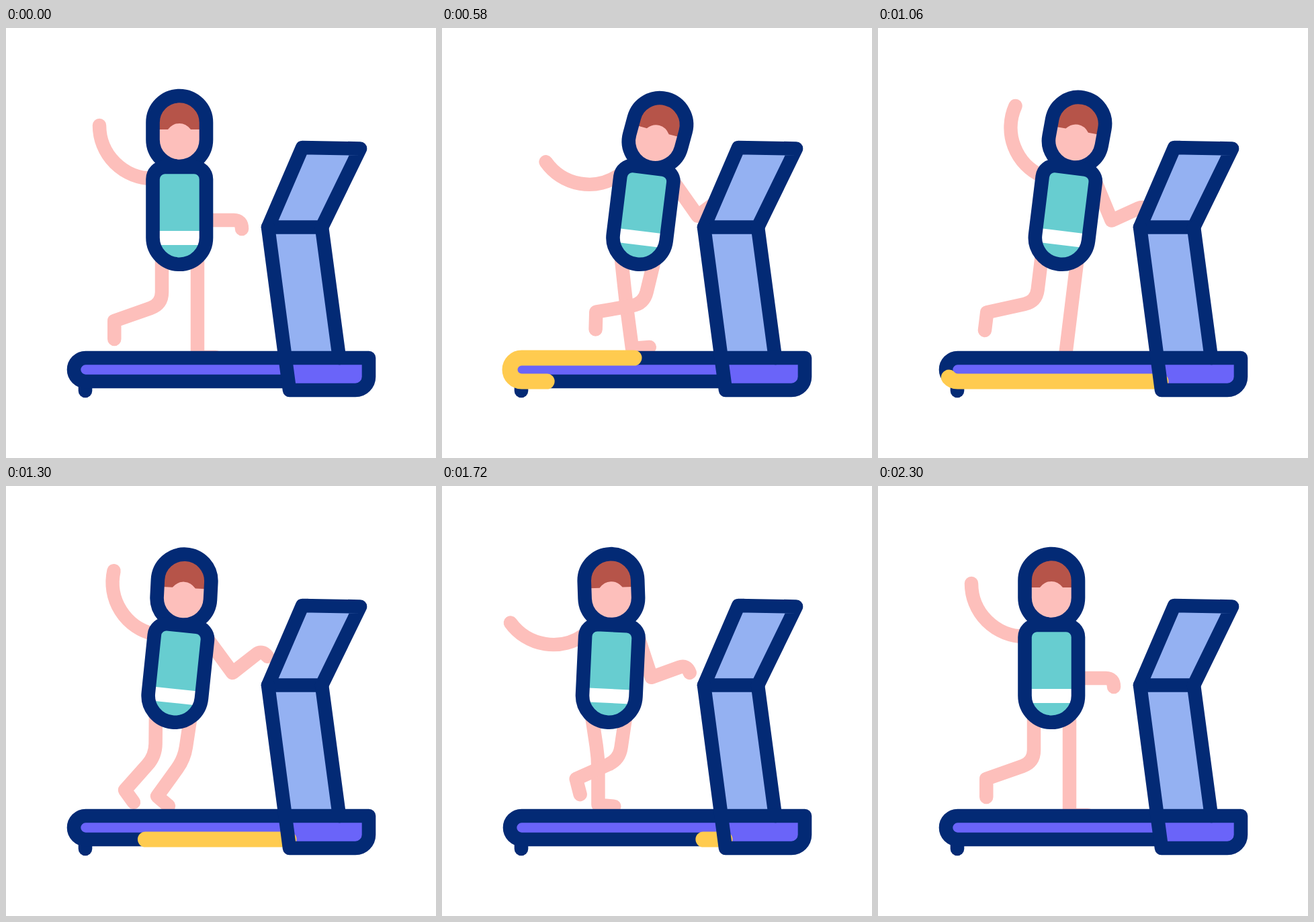
These frames come from a looping animation (640x640 px, 2400 ms). An HTML page:

```html
<!DOCTYPE html>
<html lang="en">
<head>
<meta charset="utf-8">
<title>Treadmill</title>
<style>
html, body { margin: 0; width: 100%; height: 100%; overflow: hidden; background: #fff; }
svg { display: block; width: 100vw; height: 100vh; }
.ink, .skin { fill: none; stroke-linecap: round; stroke-linejoin: round; }
.ink { stroke: #032a75; stroke-width: 20.6px; }
.skin { stroke: #fdbfbb; stroke-width: 20.5px; }
</style>
</head>
<body>
<svg viewBox="0 0 640 640">
  <g id="body">
    <path id="backArm" class="skin" d="M139 145A79 79 0 0 0 218 224"/>
    <path id="frontArm" class="skin" d="M297 222L295 286H339Q351 286 351 299"/>
    <path id="legA" class="skin"/>
    <path id="legB" class="skin"/>
    <g id="head">
      <rect x="218.500" y="101" width="79.500" height="105" rx="39.750" fill="#fdbfbb"/>
      <path fill="#b65449" d="M226 141a32 32 0 0 1 64 0V151H275Q268 142 258 142T241 151H226Z"/>
      <rect class="ink" x="218.500" y="101" width="79.500" height="105" rx="39.750"/>
    </g>
    <path fill="#67cdd0" d="M222 210H294V312A36 36 0 0 1 222 312Z"/>
    <path fill="#fff" d="M222 302H294V323H222Z"/>
    <path class="ink" d="M236 207H280A18 18 0 0 1 298 225V312A39.750 39.750 0 0 1 218.500 312V225A18 18 0 0 1 236 207Z"/>
  </g>

  <path class="ink" d="M118 526V540"/>
  <path fill="#6a64f9" d="M118.500 491H416L421 526H118.500A17.500 17.500 0 0 1 118.500 491Z"/>
  <path class="ink" d="M416 491H118.500A17.500 17.500 0 0 0 118.500 526H419"/>

  <path fill="#94b1f2" d="M390 296.500L441 178L527 179.500L470 296.500L496 491H416Z"/>
  <path fill="#6a64f9" d="M416 491H540V519A20 20 0 0 1 520 539H422Z"/>
  <path id="mark" fill="none" stroke="#ffcb4f" stroke-width="23" stroke-linecap="round"
    d="M416 491H118.500A17.500 17.500 0 0 0 118.500 526H421"/>
  <path class="ink" d="M390 296.500L441 178L527 179.500L470 296.500Z"/>
  <path class="ink" d="M470 296.500L496 491"/>
  <path class="ink" d="M390 296.500L422 539H520A20 20 0 0 0 540 519V491H416"/>
</svg>
<script>
const LOOP = 2400, STEP = 20;
const el = {};
for (const node of document.querySelectorAll('[id]')) el[node.id] = node;

const clamp = (v, max) => Math.max(0, Math.min(max, v));
const mix = (a, b, k) => a + (b - a) * k;

// Gentle ease in and out, halfway between linear and smoothstep.
const ramp = (t, from, to) => {
  const u = clamp((t - from) / (to - from), 1);
  return mix(u, u * u * (3 - 2 * u), 0.5);
};

// A value that starts at 0 and is moved by [from ms, to ms, amount].
const track = (...moves) => t =>
  moves.reduce((sum, [from, to, by]) => sum + by * ramp(t, from, to), 0);

const shift = track([0, 540, 36], [810, 1350, -45.5], [1720, 2160, 9.5]);
const lean = track([0, 540, 7], [1080, 2160, -7]);
const nod = track([0, 660, 16.5], [800, 1520, -18.5], [1720, 2300, 2]);
const backSwing = track([50, 540, -43.5], [560, 1080, 62], [1200, 1620, -62], [1640, 2160, 43.5]);
const frontSwing = track([0, 400, -44], [580, 940, 18], [940, 1300, -18], [1300, 2160, 44]);
const stride = track([0, 540, 1], [540, 960, -1], [1080, 1620, 1], [1620, 2040, -1]);

// Angles run from straight down, positive towards the console.
const legs = [
  { path: el.legA, hip: 232, thigh: [0, 14], shin: [-70.6, 20], foot: [0, 108], stretch: [7, 5] },
  { path: el.legB, hip: 285, thigh: [0, -7], shin: [0, -78], foot: [90, 0], stretch: [11, 5] }
];

const step = ([x, y], deg, len) => {
  const a = deg * Math.PI / 180;
  return [x + len * Math.sin(a), y + len * Math.cos(a)];
};

function drawLeg(leg, p) {
  const at = ([a, b]) => mix(a, b, p);
  const thigh = at(leg.thigh), shin = at(leg.shin);
  const reach = (2 * p - 1) ** 2;      // legs are shortest in mid-stride
  const hip = [leg.hip, 334];
  const knee = step(hip, thigh, 70 + 7 * reach);
  const heel = step(knee, shin, 68 + at(leg.stretch) * reach);
  const toe = step(heel, at(leg.foot), 22 + 5 * reach);
  const bendIn = step(knee, thigh, -18), bendOut = step(knee, shin, 18);
  leg.path.setAttribute('d', `M${hip}L${bendIn}Q${knee} ${bendOut}L${heel}L${toe}`);
}

const turn = (node, deg, x, y) => node.setAttribute('transform', `rotate(${deg} ${x} ${y})`);
const beltLen = el.mark.getTotalLength();

function draw(t) {
  const tilt = lean(t), p = stride(t);
  el.body.setAttribute('transform', `translate(${shift(t)} 0) rotate(${tilt} 258 312)`);
  turn(el.head, nod(t) - tilt, 258, 206);
  turn(el.backArm, backSwing(t), 216, 224);
  turn(el.frontArm, frontSwing(t), 297, 222);
  for (const leg of legs) drawLeg(leg, p);

  const front = clamp(0.672 * t, beltLen), tail = clamp(0.432 * (t - 279), beltLen);
  el.mark.style.display = front - tail > 0.5 ? '' : 'none';
  el.mark.setAttribute('stroke-dasharray', `${front - tail} 2000`);
  el.mark.setAttribute('stroke-dashoffset', -tail);
}

let origin = null;
function tick(now) {
  if (origin === null) origin = now;
  const t = (now - origin) % LOOP;
  draw(Math.floor(t / STEP) * STEP);
  requestAnimationFrame(tick);
}
draw(0);
requestAnimationFrame(tick);
</script>
</body>
</html>
```
